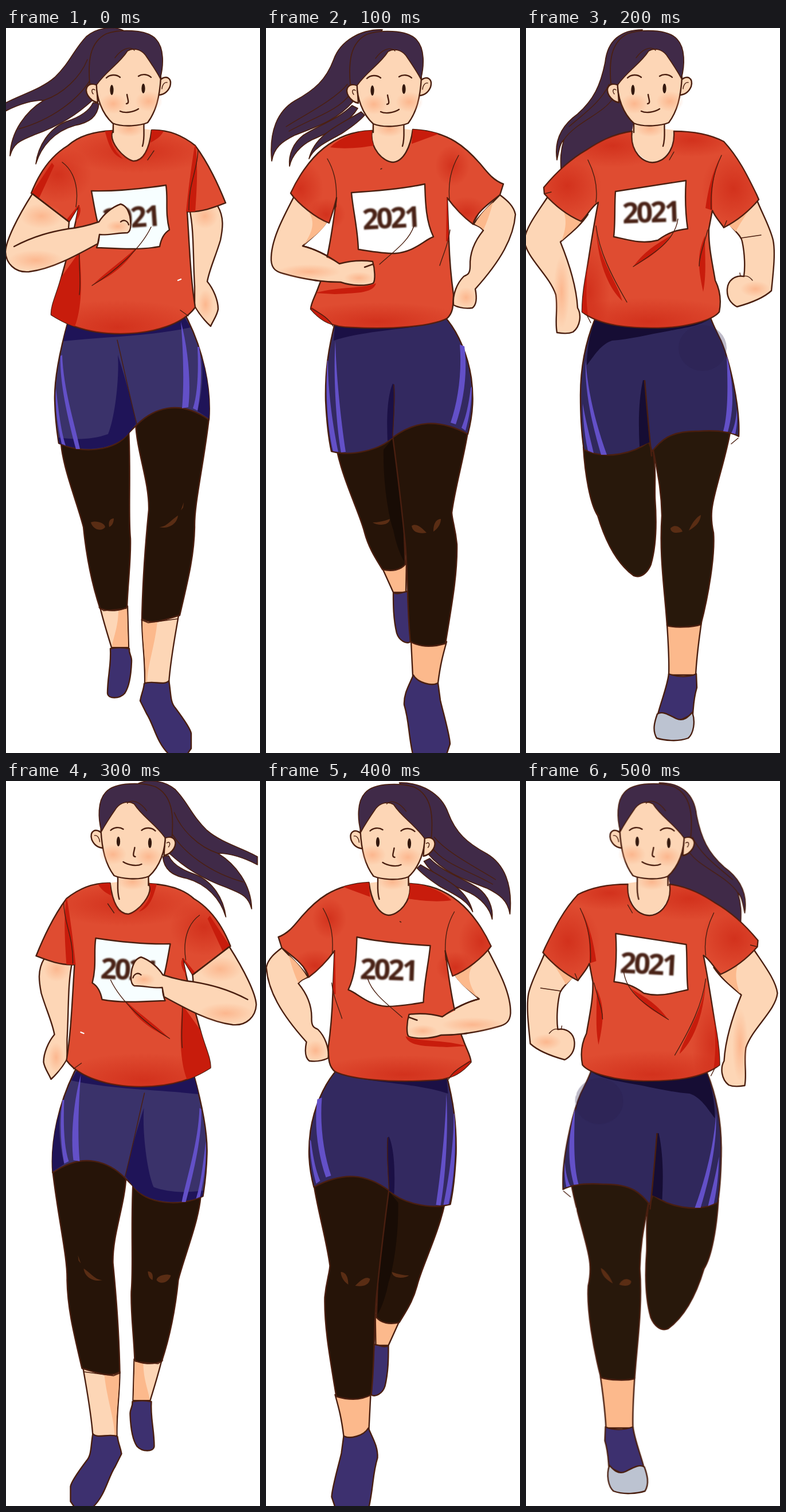
These frames come from a looping animation (443x1264 px, 0.6 s). An HTML page without scripts:

```html
<!DOCTYPE html>
<html lang="en">
<head>
<meta charset="utf-8">
<title>Runner</title>
<style>
html, body { margin: 0; width: 100%; height: 100%; overflow: hidden; background: #fff; }
body > svg { display: block; width: 100%; height: 100%; }
.strip { animation: run .6s steps(6) infinite; }
@keyframes run { to { transform: translateX(-2658px); } }

.pose { stroke: #4a1f10; stroke-width: 2.4; stroke-linejoin: round; stroke-linecap: round; }
.line { fill: none; }
.thin { fill: none; stroke-width: 1.4; }
.skin { fill: #fdd6b6; }
.tan { fill: #fcb98c; }
.hair { fill: #402a48; stroke-width: 1.7; }
.red { fill: #df4c31; }
.navy { fill: #332960; }
.shoe { fill: #3d306f; }
.leg { fill: #261408; }
.bib { fill: #fff; }
.flat { stroke: none; }
.crimson { fill: #c81c0c; stroke: none; }
.ink { fill: #1b1045; stroke: none; }
.stripe { fill: #6350c8; stroke: none; }
.knee { fill: #5a2d14; stroke: none; }
.soft { stroke: none; fill: url(#deep); }
.warm { stroke: none; fill: url(#glow); }
.num { font: 700 50px "Open Sans", "Noto Sans", sans-serif; letter-spacing: -4px; fill: #482313; }
</style>
</head>
<body>
<svg viewBox="0 0 443 1264">
<defs>
  <radialGradient id="deep"><stop stop-color="#c81c0c" stop-opacity=".55"/><stop offset="1" stop-color="#c81c0c" stop-opacity="0"/></radialGradient>
  <radialGradient id="glow"><stop stop-color="#fba274" stop-opacity=".6"/><stop offset="1" stop-color="#fba274" stop-opacity="0"/></radialGradient>
  <filter id="fuzzy"><feGaussianBlur stdDeviation=".9"/></filter>

  <path id="shirtA" d="M186 179C160 180 130 185 108 205C75 225 55 260 44 288L110 338L127 310C118 360 105 405 95 440C88 465 78 485 79 500C95 510 130 533 200 533C260 533 310 515 330 487C322 440 320 380 316 320C340 322 365 312 383 305C365 260 345 225 330 205C305 185 280 177 254 178C250 210 240 232 222 232C205 228 178 198 186 179Z"/>
  <path id="shirtB" d="M185 179C150 180 125 190 100 210C75 230 55 262 43 288C58 308 85 330 110 340C115 325 120 310 123 296C115 360 105 420 92 450C85 470 78 480 78 490C95 510 115 522 150 522C220 526 290 520 316 506C328 495 326 480 327 465C322 430 320 400 319 370L316 296C330 315 345 330 361 342C365 322 390 305 408 291L414 272C395 265 385 250 373 236C350 210 320 180 256 177C252 208 240 232 222 234C205 234 180 210 185 179Z"/>
  <path id="shirtC" d="M185 180C150 185 125 200 105 213C75 230 50 255 31 278L32 289C55 315 80 330 96 337C105 330 115 310 126 304C115 360 110 400 103 440C98 470 98 490 98 495C130 520 180 523 230 523C280 522 325 510 337 495C342 470 335 450 330 440C325 410 318 380 319 350L325 318C330 330 340 340 345 348C370 335 390 318 406 299L402 290C385 255 370 225 345 198C320 185 290 180 258 180C260 205 248 230 225 234C205 238 180 215 185 180Z"/>
  <clipPath id="clipA"><use href="#shirtA"/></clipPath>
  <clipPath id="clipB"><use href="#shirtB"/></clipPath>
  <clipPath id="clipC"><use href="#shirtC"/></clipPath>

  <text id="num" class="num" x="-2" y="18" text-anchor="middle" filter="url(#fuzzy)">2021</text>

  <g id="neck">
    <path class="skin flat" d="M187 160C186 172 184 180 181 186C182 210 205 236 224 234C245 232 258 200 257 178L241 176V155Z"/>
    <ellipse class="warm" cx="215" cy="176" rx="26" ry="14"/>
    <path class="line" d="M187 164V182M241 162C239 176 243 190 238 206"/>
  </g>

  <g id="head">
    <path class="skin" d="M158 99C142 94 136 106 143 118C148 126 155 129 160 130ZM267 92C280 80 290 88 286 102C281 114 272 117 264 117Z"/>
    <path class="thin" d="M155 108C150 104 148 110 152 115M281 95C275 94 272 102 272 106"/>
    <path class="skin" d="M158 92C156 120 168 150 186 166C205 174 235 170 247 165C262 145 268 120 270 86Q262 28 215 30Q168 36 158 92Z"/>
    <ellipse class="warm" cx="187" cy="132" rx="24" ry="18"/>
    <ellipse class="warm" cx="249" cy="128" rx="24" ry="18"/>
    <path class="hair" d="M146 97C143 60 145 25 175 10C195 3 245 0 262 20C276 35 275 65 269 88C262 75 252 60 243 47C235 37 222 34 212 40C198 62 175 75 158 99Z"/>
    <path class="thin" d="M224 39C215 30 200 38 190 52"/>
    <path class="line" d="M175 87C181 81 192 80 199 86M231 84C238 79 248 81 253 86M211 116C212 124 216 131 210 132M199 145C207 149 222 147 231 141"/>
    <g fill="#33180e" stroke="none"><ellipse cx="184.500" cy="108" rx="3.100" ry="9"/><ellipse cx="239.500" cy="105.500" rx="3.100" ry="8.500"/></g>
  </g>

  <g id="a" class="pose">
    <path class="hair" d="M206 5C190 -4 160 -2 140 15C118 38 112 60 85 86C60 108 20 118 -3 132V146C20 134 45 126 66 126C35 145 8 180 7 223C14 198 28 196 50 186C95 170 125 150 152 125L165 60Z"/>
    <path class="hair" d="M162 132C160 155 145 165 120 170C85 180 62 205 52 237C56 205 75 175 105 163C130 155 145 145 152 130Z"/>
    <path class="thin" d="M142 55C130 85 100 115 66 126M146 92C125 125 80 160 22 176"/>
    <use href="#neck"/>
    <path class="skin" d="M320 316C328 350 326 400 329 450L329 485C336 497 346 510 357 520C361 510 368 502 370 490C370 475 362 455 351 442C355 420 365 400 374 370C378 350 381 330 369 310Z"/>
    <ellipse class="warm" cx="347" cy="328" rx="23" ry="22"/>
    <ellipse class="warm" cx="348" cy="482" rx="14" ry="26"/>
    <path class="skin" d="M164 1010C170 1035 178 1060 184 1080H214L212 1008Z"/>
    <path class="tan flat" d="M196 1015C196 1045 186 1065 185 1079H213L211 1012Z"/>
    <path class="skin" d="M237 1030C237 1070 243 1100 242 1142H284C287 1100 295 1060 301 1024Z"/>
    <path class="tan flat" d="M238 1034L264 1035C260 1075 247 1110 246 1140H243C244 1100 238 1070 238 1034Z"/>
    <path class="shoe" d="M182 1082C195 1079 205 1080 215 1082C214 1092 220 1095 219 1105C218 1130 214 1150 207 1160C198 1170 178 1170 177 1160C177 1130 184 1110 182 1082Z"/>
    <path class="shoe" d="M241 1143C255 1136 275 1148 284 1138C288 1160 286 1175 295 1185C310 1205 322 1222 323 1230V1256L316 1266H284C262 1245 258 1215 245 1195L234 1173C236 1160 240 1155 241 1143Z"/>
    <path class="leg" d="M96 725C100 770 125 830 135 870C140 920 150 970 164 1012C180 1018 200 1016 211 1010C213 960 218 930 217 890C213 850 218 780 214 700Z"/>
    <path class="leg" d="M226 688C228 740 250 790 249 840C243 900 238 980 237 1030C255 1042 280 1030 303 1024C318 960 328 920 329 870C328 830 345 760 354 680L346 640H240Z"/>
    <path class="thin" d="M162 1010L170 1016L210 1012M236 1032L248 1037L300 1030"/>
    <path class="knee" d="M148 862C155 858 172 862 173 870C168 878 152 876 148 862ZM180 870C178 860 182 855 188 855C188 862 185 868 180 870ZM267 870C280 870 285 860 300 850C298 866 282 874 267 870ZM305 841L310 827L309 836Z"/>
    <path fill="#3a326a" d="M108 512C92 570 84 620 85 650C86 690 90 710 92 724C130 742 190 740 215 705L228 692C255 665 300 645 354 683C358 630 345 560 310 495Z"/>
    <path class="ink" style="fill:#1f1458" d="M108 514C105 525 102 535 100 546C170 538 250 538 322 522L312 505ZM195 570C198 610 190 680 178 708C150 718 120 718 91 714L93 724C130 740 190 738 215 705L227 690C222 660 205 600 195 570ZM341 575C345 610 340 645 334 668L354 681C357 645 350 600 341 575Z"/>
    <path class="stripe" d="M95 572C93 620 110 690 122 734H129C120 690 100 630 98 570ZM87 628C85 670 92 700 97 725L104 728C95 700 91 660 87 628ZM305 512C309 560 311 620 307 663L318 661C323 620 318 560 305 512ZM334 556C336 600 334 640 326 663L334 667C341 630 342 590 337 556Z"/>
    <path class="thin" d="M194 544C205 590 215 640 228 690"/>
    <use href="#shirtA" class="red"/>
    <g clip-path="url(#clipA)">
      <ellipse class="soft" cx="195" cy="522" rx="160" ry="48"/>
      <ellipse class="soft" cx="230" cy="215" rx="130" ry="38"/>
      <ellipse class="soft" cx="90" cy="255" rx="60" ry="50"/>
      <path class="crimson" d="M330 200C336 240 332 290 330 322L314 320C318 280 324 235 330 200ZM70 515L96 435L128 390C132 430 134 485 120 520ZM104 336L126 309C136 315 125 340 110 348ZM172 178L186 178C178 198 190 215 204 228C184 222 178 200 172 178ZM254 176L275 180C268 192 260 195 252 200ZM44 289L80 235L84 240L58 296Z"/>
    </g>
    <path class="thin" d="M98 234C120 250 127 280 122 312M128 390C127 420 131 440 128 465M335 212C334 250 318 270 319 318M304 492L318 502M258 214L247 230"/>
    <path class="crimson" d="M150 449C180 420 205 405 230 380C205 420 180 433 150 449Z"/>
    <path d="M300 440L305 438" style="stroke:#fff"/>
    <path style="fill:#f7feff" d="M149 284C190 285 240 280 279 274C283 300 277 320 285 352C275 358 270 370 268 381C230 388 190 384 158 383C163 370 164 362 160 340C155 320 152 300 149 284Z"/>
    <use href="#head"/>
  </g>
  <g id="armA" class="pose">
    <path class="thin" d="M150 449C190 425 235 385 253 347"/>
    <path class="skin" d="M46 289L110 338L109 350C130 348 150 342 162 338C170 325 185 312 200 307C210 310 213 318 216 328C219 345 218 354 212 357C195 357 175 362 163 360L160 376C120 398 80 420 40 425C15 427 0 410 -1 390C0 370 20 330 46 289Z"/>
    <ellipse class="warm" cx="62" cy="328" rx="38" ry="22"/>
    <ellipse class="warm" cx="52" cy="405" rx="48" ry="18"/>
    <ellipse class="warm" cx="195" cy="346" rx="20" ry="11"/>
    <path class="line" d="M14 381C50 362 80 355 109 350M46 289L110 338M200 338C205 333 212 336 214 343"/>
  </g>

  <g id="b" class="pose">
    <path class="hair" d="M203 3C165 2 130 22 118 55C105 90 85 108 50 127C20 145 5 180 10 232C14 208 28 198 50 187C90 172 125 160 152 128L165 60Z"/>
    <path class="hair" d="M150 135C125 160 90 170 65 187C48 200 39 220 41 241C45 222 60 205 80 195C115 180 145 165 160 140Z"/>
    <path class="hair" d="M166 146C130 168 85 185 75 228C85 205 115 195 135 182C150 172 165 160 172 152Z"/>
    <path class="thin" d="M142 98C120 125 70 150 35 172M147 115C125 145 85 155 40 180"/>
    <use href="#neck"/>
    <path class="tan" d="M203 942L222 984L244 984L245 930Z"/>
    <path class="shoe" d="M222 985C230 988 238 984 247 982L252 1070C245 1075 232 1068 228 1055C222 1030 222 1005 222 985Z"/>
    <path class="leg" d="M124 738C135 790 165 850 172 880C180 910 195 930 203 944C220 948 235 945 243 935L238 800L221 712Z"/>
    <path class="flat" fill="#180c05" d="M205 735C204 790 213 850 222 875C226 895 232 915 241 930L237 800L221 716Z"/>
    <path class="tan" d="M253 1070L256 1130C257 1145 290 1148 300 1142C304 1110 308 1095 315 1070Z"/>
    <path class="shoe" d="M257 1128C265 1142 290 1148 300 1142L304 1172C308 1190 320 1230 321 1248L315 1266H256C248 1230 250 1210 241 1180C240 1160 250 1145 257 1128Z"/>
    <path class="leg" d="M221 712C230 780 238 850 243 900C248 960 246 1020 252 1070C270 1080 290 1080 313 1073C325 1000 334 950 333 900C330 870 325 860 324 845C330 800 345 750 352 704L344 660H230Z"/>
    <path class="knee" d="M186 862C195 862 205 860 216 856C215 868 195 868 186 862ZM254 868C262 862 272 872 280 880C268 882 256 880 254 868ZM292 878C292 862 298 856 305 856C305 866 298 874 292 878Z"/>
    <path class="navy" d="M122 508C108 560 103 600 104 650C106 690 110 720 114 738C150 748 200 735 221 714C260 685 300 680 352 708C362 670 362 640 358 610C352 570 335 530 313 505Z"/>
    <path class="ink" d="M121 511L290 513C270 525 180 525 118 545ZM221 620C212 640 210 680 212 720L221 714C222 690 226 650 224 622Z"/>
    <path class="stripe" d="M121 545C122 600 130 680 139 739L131 740C122 690 117 600 121 545ZM108 580C108 640 118 700 126 739L117 738C108 700 103 640 107 580ZM338 552C342 600 335 650 322 688L331 691C345 650 352 600 346 555ZM357 628C353 660 348 680 341 697L348 702C354 680 359 655 359 625Z"/>
    <path class="thin" d="M223 622C225 650 222 690 221 712"/>
    <path class="skin" d="M52 288C30 330 8 370 9 405C10 420 18 425 30 428C65 438 100 443 130 443L130 411C105 395 85 385 64 380C80 365 95 355 108 335Z"/>
    <path class="tan flat" d="M70 315L107 338C97 355 82 364 66 378C82 355 88 335 70 315Z"/>
    <use href="#shirtB" class="red"/>
    <g clip-path="url(#clipB)">
      <ellipse class="soft" cx="195" cy="512" rx="160" ry="34"/>
      <ellipse class="soft" cx="60" cy="280" rx="40" ry="50"/>
      <ellipse class="soft" cx="325" cy="240" rx="30" ry="36"/>
      <ellipse class="soft" cx="350" cy="322" rx="40" ry="28"/>
      <ellipse class="soft" cx="105" cy="325" rx="34" ry="28"/>
      <path class="crimson" d="M85 462C130 450 170 455 192 445C187 464 150 462 120 464ZM76 484C95 498 112 506 120 524L90 518ZM185 177C160 180 130 190 112 208C140 212 170 208 188 205ZM256 175L303 184L254 202ZM315 295L324 310L321 370L314 372Z"/>
    </g>
    <path class="thin" d="M107 228C120 250 125 275 122 312M336 222C320 250 318 275 320 300M321 352C318 375 311 390 303 414M78 488C95 498 110 506 117 520M200 246L202 245M43 288L47 294M361 342L372 322"/>
    <path class="skin flat" d="M128 411C150 405 170 405 186 407C190 420 191 440 187 445C175 450 150 450 130 443L90 440V392Z"/>
    <path class="line" d="M64 380C85 385 105 395 128 411C150 405 170 405 186 407C190 420 191 440 187 445C175 450 150 450 130 443C115 443 100 442 85 440M186 412L172 417"/>
    <path class="skin" d="M368 334C380 318 395 305 408 291C420 300 432 310 435 325C432 365 410 405 365 455C368 470 368 482 360 488C345 490 335 487 327 483C325 465 333 445 345 433C352 430 356 428 356 415C355 390 365 370 379 353C375 347 368 344 362 342Z"/>
    <path class="tan flat" d="M368 335C378 320 387 311 396 304C390 325 385 340 379 352C375 347 370 345 364 342Z"/>
    <ellipse class="warm" cx="349" cy="470" rx="18" ry="18"/>
    <ellipse class="warm" cx="75" cy="425" rx="55" ry="13"/>
    <ellipse class="warm" cx="162" cy="436" rx="26" ry="11"/>
    <path class="bib" d="M149 287C200 284 250 278 277 272C278 300 278 335 292 364C275 370 260 390 225 393C200 393 175 388 161 386C160 350 152 320 149 287Z"/>
    <use href="#head" x="1" y="1"/>
  </g>
  <path id="foldB" class="pose thin" d="M198 412C225 388 250 370 258 345"/>

  <g id="c" class="pose">
    <path class="hair" d="M203 3C165 3 142 22 138 60C130 100 118 125 90 150C55 175 50 205 54 230C58 210 60 200 66 195C60 215 60 230 61 246L120 215L195 185L165 60Z"/>
    <path class="thin" d="M152 122C135 150 85 165 66 195M145 98C130 130 100 150 75 172"/>
    <use href="#neck" x="1"/>
    <path class="tan" d="M246 1040C248 1070 250 1100 249 1128L296 1128C298 1090 302 1065 306 1036Z"/>
    <path class="shoe" d="M249 1126C265 1132 285 1132 297 1126L298 1150C292 1170 292 1185 291 1196L262 1210L229 1200C235 1175 246 1150 249 1126Z"/>
    <path fill="#bcc3d1" d="M229 1196C238 1190 250 1198 262 1204C275 1210 284 1200 290 1193C296 1210 292 1230 283 1238C265 1245 240 1242 228 1238C220 1225 224 1210 229 1196Z"/>
    <path class="leg" style="fill:#28180b" d="M100 730C103 780 112 830 125 850C140 900 160 935 188 955C200 960 212 950 218 935C228 900 228 860 225 820C224 790 228 770 219 720Z"/>
    <path class="leg" style="fill:#28180b" d="M220 725C228 770 236 800 237 850C232 920 242 980 246 1042C260 1046 290 1045 305 1040C318 990 330 920 327 880C320 850 325 830 330 810C340 770 350 740 357 700L350 670H230Z"/>
    <path class="knee" d="M252 872C260 864 270 870 273 878C262 882 252 880 252 872ZM284 876C290 862 298 852 305 849C304 862 295 870 284 876Z"/>
    <path class="thin" d="M358 725L370 715M123 845L128 852"/>
    <path fill="#30285c" d="M120 508C105 545 95 590 95 640C95 690 98 715 101 735C140 755 190 740 214 722L220 738C235 720 250 702 300 703C330 701 355 703 371 712C374 660 355 580 340 545C330 525 325 515 322 505Z"/>
    <ellipse class="flat" cx="308" cy="558" rx="42" ry="40" fill="#281e4e" opacity=".3"/>
    <path class="ink" style="fill:#160d34" d="M120 510L322 507C300 520 280 522 250 528C210 535 180 543 150 545C130 552 120 570 106 588C106 560 112 530 120 510ZM204 614C196 650 196 690 198 730L216 722C212 690 210 650 208 614Z"/>
    <path class="stripe" d="M104 580C108 640 125 700 141 744L131 744C118 700 102 640 104 580ZM99 655C105 690 112 715 118 741L108 737C102 710 99 680 99 655ZM350 570C352 620 353 670 344 703L352 704C364 660 362 620 350 570ZM368 665C366 685 362 700 358 706L365 708C368 695 369 680 368 665Z"/>
    <path class="line" d="M207 615C210 650 214 700 219 746"/>
    <path class="skin" d="M44 285C25 315 0 345 -3 370C0 400 40 430 52 465C56 490 50 510 54 531C65 533 75 533 82 530C95 520 97 500 90 488C88 450 75 410 60 373C75 360 95 345 108 325Z"/>
    <path class="tan flat" d="M58 305L96 338C84 352 72 361 62 371C70 350 74 328 58 305Z"/>
    <path class="skin" d="M350 335C358 350 375 360 377 372C382 395 382 420 380 433C365 430 352 440 351 455C350 470 357 480 368 486C390 480 415 470 428 458C432 420 435 390 431 370C425 345 410 320 402 298Z"/>
    <path class="tan flat" d="M352 342L388 318C380 332 372 342 366 355Z"/>
    <ellipse class="warm" cx="62" cy="460" rx="14" ry="64"/>
    <ellipse class="warm" cx="400" cy="455" rx="26" ry="14"/>
    <path class="thin" d="M376 366L410 361M374 433L373 427M380 433C385 431 390 434 395 440M98 485L113 514"/>
    <use href="#shirtC" class="red"/>
    <g clip-path="url(#clipC)">
      <ellipse class="soft" cx="215" cy="512" rx="170" ry="42"/>
      <ellipse class="soft" cx="110" cy="460" rx="36" ry="90"/>
      <ellipse class="soft" cx="150" cy="205" rx="100" ry="38"/>
      <ellipse class="soft" cx="290" cy="195" rx="80" ry="30"/>
      <ellipse class="soft" cx="72" cy="275" rx="60" ry="58"/>
      <ellipse class="soft" cx="362" cy="280" rx="56" ry="66"/>
      <path class="crimson" d="M122 345C125 400 160 445 168 476C140 450 124 400 122 345ZM126 304C112 370 100 440 108 500L96 495L110 380ZM312 362C300 390 298 410 309 460C315 430 312 400 312 362ZM338 226C324 265 324 290 325 318L313 314C318 280 324 255 338 226ZM187 416C210 385 232 375 252 362C230 395 205 405 187 416Z"/>
    </g>
    <path class="thin" d="M108 230C118 250 126 275 122 304M341 222C325 255 322 285 323 316M122 345C128 390 148 430 176 478M317 352C308 385 302 400 302 415M258 216L250 230M345 348L350 336M32 289L44 286"/>
    <path class="bib" d="M156 285C200 278 240 272 279 266C277 300 279 330 282 350C265 352 250 355 230 370C200 378 175 368 153 364C156 340 154 310 156 285Z"/>
    <use href="#head" x="2"/>
  </g>
  <path id="foldC" class="pose thin" d="M187 416C225 392 260 370 265 333"/>
</defs>

<g class="strip">
  <svg width="443" height="1264">
    <use href="#a"/>
    <use href="#num" transform="translate(219 330) rotate(-4)"/>
    <use href="#armA"/>
  </svg>
  <svg x="443" width="443" height="1264">
    <use href="#b"/>
    <use href="#num" transform="translate(219 331) rotate(-3)"/>
    <use href="#foldB"/>
  </svg>
  <svg x="886" width="443" height="1264">
    <use href="#c"/>
    <use href="#num" transform="translate(219 321) rotate(-2)"/>
    <use href="#foldC"/>
  </svg>
  <svg x="1329" width="443" height="1264">
    <use href="#a" transform="translate(435.500) scale(-1 1)"/>
    <use href="#num" transform="translate(216 329) rotate(3)"/>
    <use href="#armA" transform="translate(435.500) scale(-1 1)"/>
  </svg>
  <svg x="1772" width="443" height="1264">
    <use href="#b" transform="translate(435.500) scale(-1 1)"/>
    <use href="#num" transform="translate(215 329) rotate(2)"/>
    <use href="#foldB" transform="translate(435.500) scale(-1 1)"/>
  </svg>
  <svg x="2215" width="443" height="1264">
    <use href="#c" transform="translate(435.500) scale(-1 1)"/>
    <use href="#num" transform="translate(215 319) rotate(3)"/>
    <use href="#foldC" transform="translate(435.500) scale(-1 1)"/>
  </svg>
</g>
</svg>
</body>
</html>
```
